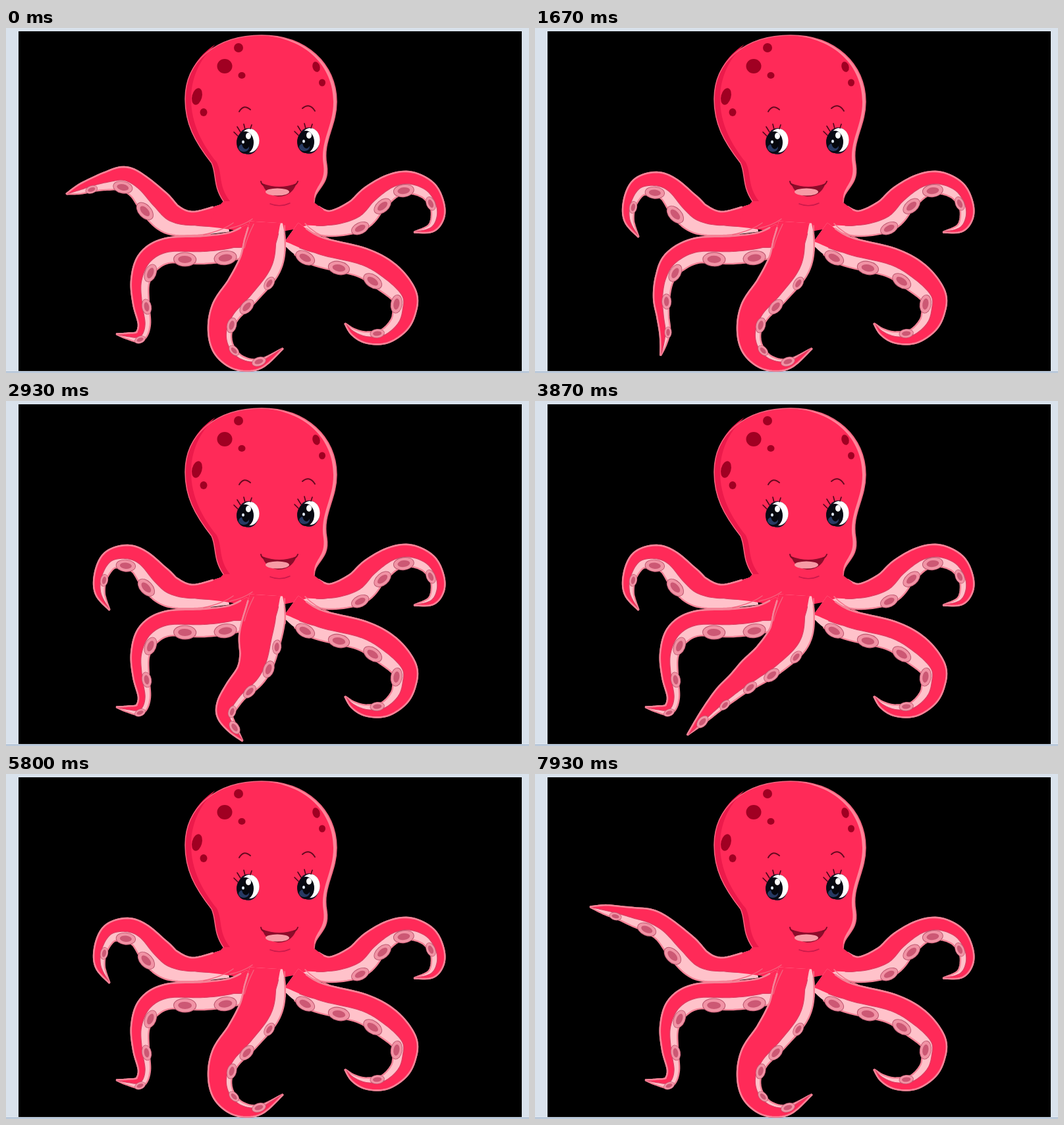
These frames come from a looping animation (794x524 px, 8 s). An HTML page with a canvas:

```html
<!DOCTYPE html>
<html lang="en">
<head>
<meta charset="utf-8">
<title>Octopus</title>
<style>
  html, body { margin: 0; width: 100%; height: 100%; overflow: hidden; background: #d9e2ec; }
  canvas { display: block; }
</style>
</head>
<body>
<canvas id="stage" width="794" height="524"></canvas>
<script>
const ctx = document.getElementById('stage').getContext('2d');
const LOOP = 8000, STEP = 1000 / 15;
const RED = '#ff2a58', SHADE = '#ec1a4b', PINK = '#ffc2ca', EDGE = '#f58397',
      CUP = '#f193a5', CUP_CORE = '#cc5874', SPOT = '#a00022';

// Each arm: rest spine, widths, alternative tails, suckers [position, size], keys [ms, pose].
const upperLeft = {
  side: -1, red: .57,
  rest: [[335,288],[285,297],[250,290],[229,273],[205,246],[183,237],[158,242],[144,266],[143,292],[157,317]],
  width: [44, 36, 46, 48, 38, 36, 28, 20, 14, 1],
  tails: [
    [[227,268],[203,242],[180,229],[155,232],[132,238],[112,245],[92,252]],
    [[225,266],[198,238],[175,224],[150,217],[128,211],[106,206],[84,202]],
    [[224,264],[196,235],[172,219],[147,209],[124,200],[102,192],[81,184]]
  ],
  suckers: [[3.1, 1], [5, .95], [7.2, .6]],
  keys: [[0,1],[70,2],[200,3],[420,2],[550,1],[870,0],[7250,0],[7860,1],[7930,2],[8000,2]]
};
const lowerLeft = {
  side: -1, red: .56,
  rest: [[375,318],[345,331],[300,337],[246,338],[217,354],[204,384],[205,418],[210,450],[203,468],[185,468],[168,465]],
  width: [44, 42, 42, 38, 36, 28, 24, 18, 16, 9, 1],
  tails: [
    [[212,355],[197,380],[192,410],[194,437],[197,460],[195,480],[191,497]],
    [[212,352],[185,372],[160,392],[135,408],[110,420],[88,428],[66,434]]
  ],
  suckers: [[1.35, 1.1], [2.5, 1.1], [4.5, .9], [6.2, .75], [8.1, .55]],
  keys: [[1000,0],[1670,1],[1950,2],[2200,2],[2450,1],[2800,0]]
};
const middle = {
  side: -1, red: .77,
  rest: [[395,295],[393,325],[386,358],[361,396],[335,428],[325,460],[331,488],[353,508],[385,510],[420,487]],
  width: [50, 62, 64, 54, 46, 36, 31, 23, 14, 1],
  tails: [
    [[382,390],[372,415],[350,440],[336,462],[333,478],[345,498],[360,516]],
    [[358,390],[330,412],[308,430],[288,447],[270,465],[252,485],[232,507]],
    [[355,388],[322,408],[297,425],[273,442],[250,460],[226,479],[201,498]]
  ],
  suckers: [[2.4, .7], [3.4, .85], [4.6, .75], [6.4, .6], [8, .7]],
  keys: [[2670,0],[2930,1],[3400,3],[3530,3],[3870,2],[4200,1],[4450,0]]
};
const lowerRight = {
  side: 1, red: .58,
  rest: [[432,312],[470,338],[540,356],[578,378],[604,405],[605,428],[597,450],[575,468],[548,470],[528,462],[515,449]],
  width: [40, 44, 44, 46, 38, 35, 29, 22, 17, 10, 1],
  tails: [
    [[585,370],[625,385],[652,402],[668,420],[678,440],[685,460],[688,478],[690,497]],
    [[590,366],[630,376],[660,384],[688,392],[712,400],[735,408],[756,415],[778,420]]
  ],
  suckers: [[.85, 1], [1.55, 1.05], [2.65, 1], [4.7, .9], [7.4, .7]],
  keys: [[4450,0],[5130,1],[5360,2],[5540,1],[5800,0]]
};
const upperRight = {
  side: 1, red: .56,
  rest: [[455,285],[490,297],[533,285],[558,260],[586,240],[613,235],[640,246],[654,268],[655,288],[645,304],[620,310]],
  width: [44, 38, 48, 44, 36, 33, 28, 22, 19, 12, 1],
  tails: [
    [[530,283],[555,252],[580,225],[608,208],[638,193],[665,178],[690,168],[715,160],[743,155]]
  ],
  suckers: [[1.9, .9], [3.1, .95], [4.6, 1], [6.8, .7]],
  keys: [[5800,0],[6530,1],[6700,1],[7250,0]]
};

const lerp = (a, b, k) => a + (b - a) * k;

function pose(arm, n) {
  if (!n) return arm.rest;
  const tail = arm.tails[n - 1];
  return arm.rest.slice(0, arm.rest.length - tail.length).concat(tail);
}

function spineAt(arm, t) {
  const keys = arm.keys, last = keys[keys.length - 1];
  let from = keys[0], to = from;
  if (t >= last[0]) from = to = last;
  else if (t > from[0]) {
    const i = keys.findIndex(k => k[0] > t);
    from = keys[i - 1];
    to = keys[i];
  }
  const k = to === from ? 0 : (t - from[0]) / (to[0] - from[0]);
  const a = pose(arm, from[1]), b = pose(arm, to[1]);
  return a.map((p, i) => [lerp(p[0], b[i][0], k), lerp(p[1], b[i][1], k), arm.width[i]]);
}

function curve(pts, u) {
  const last = pts.length - 1;
  const i = Math.min(Math.floor(u), last - 1), f = u - i;
  const at = j => pts[Math.max(0, Math.min(last, j))];
  const [a, b, c, d] = [at(i - 1), at(i), at(i + 1), at(i + 2)];
  return b.map((v, n) => v + f / 2 * (c[n] - a[n] +
    f * (2 * a[n] - 5 * v + 4 * c[n] - d[n] + f * (3 * (v - c[n]) + d[n] - a[n]))));
}

// offset runs from -1 (outer edge) to 1 (sucker edge)
function across(arm, pts, u, offset, extra = 0) {
  const end = pts.length - 1;
  const p = curve(pts, u), a = curve(pts, Math.max(0, u - .05)), b = curve(pts, Math.min(end, u + .05));
  const angle = Math.atan2(b[1] - a[1], b[0] - a[0]);
  const d = arm.side * (Math.max(0, p[2]) / 2 * offset + extra);
  return [p[0] - Math.sin(angle) * d, p[1] + Math.cos(angle) * d, angle];
}

function trace(points) {
  ctx.beginPath();
  points.forEach(p => ctx.lineTo(p[0], p[1]));
}

function fill(color) { ctx.fillStyle = color; ctx.fill(); }
function stroke(color, width) { ctx.strokeStyle = color; ctx.lineWidth = width; ctx.stroke(); }

function oval(x, y, rx, ry, color, angle = 0) {
  ctx.beginPath();
  ctx.ellipse(x, y, rx, ry, angle, 0, Math.PI * 2);
  fill(color);
}

function drawArm(arm, t) {
  const pts = spineAt(arm, t), end = pts.length - 1;
  const outer = [], inner = [], seam = [];
  for (let n = 0; n <= end * 10; n++) {
    const u = n / 10;
    const grow = Math.min(1, .25 + u / 1.3);
    outer.push(across(arm, pts, u, -1));
    inner.push(across(arm, pts, u, 1));
    seam.push(across(arm, pts, u, 1 - 2 * (1 - arm.red) * grow));
  }
  trace([...outer, ...inner.slice().reverse()]);
  fill(PINK);
  trace([...outer.slice(4), ...inner.slice(6).reverse()]);
  stroke(EDGE, 2.4);
  trace([...outer, ...seam.slice().reverse()]);
  fill(RED);
  trace(seam.slice(6));
  stroke('#dc3c61', 1.2);
  trace(outer.slice(4));
  stroke(EDGE, 2.6);
  for (const [u, size] of arm.suckers) {
    const [x, y, angle] = across(arm, pts, u, 1, -5 * size);
    oval(x, y, 16 * size, 10 * size, '#bd5870', angle);
    oval(x, y, 15 * size, 9 * size, CUP, angle);
    oval(x, y, 9.5 * size, 5 * size, CUP_CORE, angle);
  }
}

const head = new Path2D(`M330 263C314 240 320 222 312 205C286 172 272 145 272 108
  C272 50 320 11 388 11C456 11 502 55 502 112C502 150 480 172 487 208C492 240 468 244 468 265`);
const body = new Path2D(head);
body.lineTo(482, 276);
body.quadraticCurveTo(475, 300, 425, 308);
body.lineTo(372, 312);
body.quadraticCurveTo(340, 305, 308, 302);
body.quadraticCurveTo(310, 284, 330, 263);
const leftShade = new Path2D(`M330 263C314 240 320 222 312 205C286 172 272 145 272 108
  C272 72 290 42 318 25C293 48 281 77 281 108C281 145 298 177 320 204C329 222 322 240 340 263Z`);
const rightGlow = new Path2D(`M388 11C456 11 502 55 502 112C502 150 480 172 487 208
  C492 240 468 244 468 265C465 240 486 238 482 208C476 172 497 150 497 112C497 58 455 15 388 11Z`);

function line(d, color, width) {
  ctx.strokeStyle = color;
  ctx.lineWidth = width;
  ctx.stroke(new Path2D(d));
}

function drawEye(x, y) {
  oval(x + 3, y, 16, 20, '#1b1426');
  oval(x + 5, y - 1, 14.5, 18, '#fff');
  oval(x - 2, y + 2, 13, 17, '#070a14');
  oval(x - 4, y + 10, 8, 6, '#273a63');
  oval(x - 1, y + 2, 6, 10, '#05070d');
  oval(x + 3, y - 8, 4, 5, '#fff');
  oval(x - 5, y + 1, 2, 2.5, '#dfe9f8');
  line(`M${x - 13} ${y - 8}l-6 -6M${x - 9} ${y - 14}l-5 -8M${x - 2} ${y - 18}l-2 -8M${x + 6} ${y - 19}l2 -6`, '#4a0719', 1.6);
}

function drawHead() {
  ctx.fillStyle = RED;
  ctx.fill(body);
  ctx.fillStyle = SHADE;
  ctx.fill(leftShade);
  ctx.fillStyle = '#ff8499';
  ctx.fill(rightGlow);
  ctx.strokeStyle = '#f2647e';
  ctx.lineWidth = 1.5;
  ctx.stroke(head);

  oval(332, 58, 11.5, 11, SPOT);
  oval(353, 30, 7, 7, SPOT);
  oval(358, 72, 5.5, 5, SPOT);
  oval(290, 104, 7.5, 13, SPOT, .25);
  oval(300, 128, 5.5, 6, SPOT);
  oval(471, 59, 5.5, 8, SPOT, -.3);
  oval(480, 83, 5, 5.5, SPOT);

  line('M354 127Q361 115 371 124M450 122Q461 113 469 126', '#65091f', 2);
  drawEye(365, 172);
  drawEye(457, 171);

  ctx.fillStyle = '#8c0c2a';
  ctx.fill(new Path2D('M389 236Q415 246 441 236Q434 256 413 256Q394 253 389 236Z'));
  oval(412, 249, 18, 5.5, '#f79aa5');
  line('M387 233Q388 238 392 239M443 233Q441 238 437 239', '#7b0b25', 2);
  line('M401 267Q416 273 431 266', '#c9194a', 1.6);
}

function drawFrame() {
  ctx.fillStyle = '#d9e2ec';
  ctx.fillRect(0, 0, 794, 524);
  ctx.fillStyle = '#000';
  ctx.fillRect(19, 5, 764, 516);
  ctx.fillStyle = '#8fa6c2';
  ctx.fillRect(0, 522, 794, 1);
}

function draw(t) {
  drawFrame();
  drawArm(upperLeft, t);
  drawArm(upperRight, t);
  drawHead();
  drawArm(lowerLeft, t);
  drawArm(lowerRight, t);
  drawArm(middle, t);
  line('M376 298Q366 318 362 334M374 290Q360 300 340 304M345 296Q330 307 300 314', '#f4607c', 1.5);
  line('M423 300L424 338M454 297Q468 312 490 320', '#f4788e', 1.6);
}

// fifteen pictures a second, with three short rests
function stepped(t) {
  const s = Math.floor((t + 4) / STEP) * STEP;
  for (const [from, to] of [[866, 999], [3666, 3866], [3866, 4066]]) {
    if (s >= from && s < to) return from;
  }
  return s;
}

ctx.lineJoin = ctx.lineCap = 'round';
const start = performance.now();
function tick() {
  draw(Math.min(stepped((performance.now() - start) % LOOP), LOOP - 1));
  requestAnimationFrame(tick);
}
tick();
</script>
</body>
</html>
```
